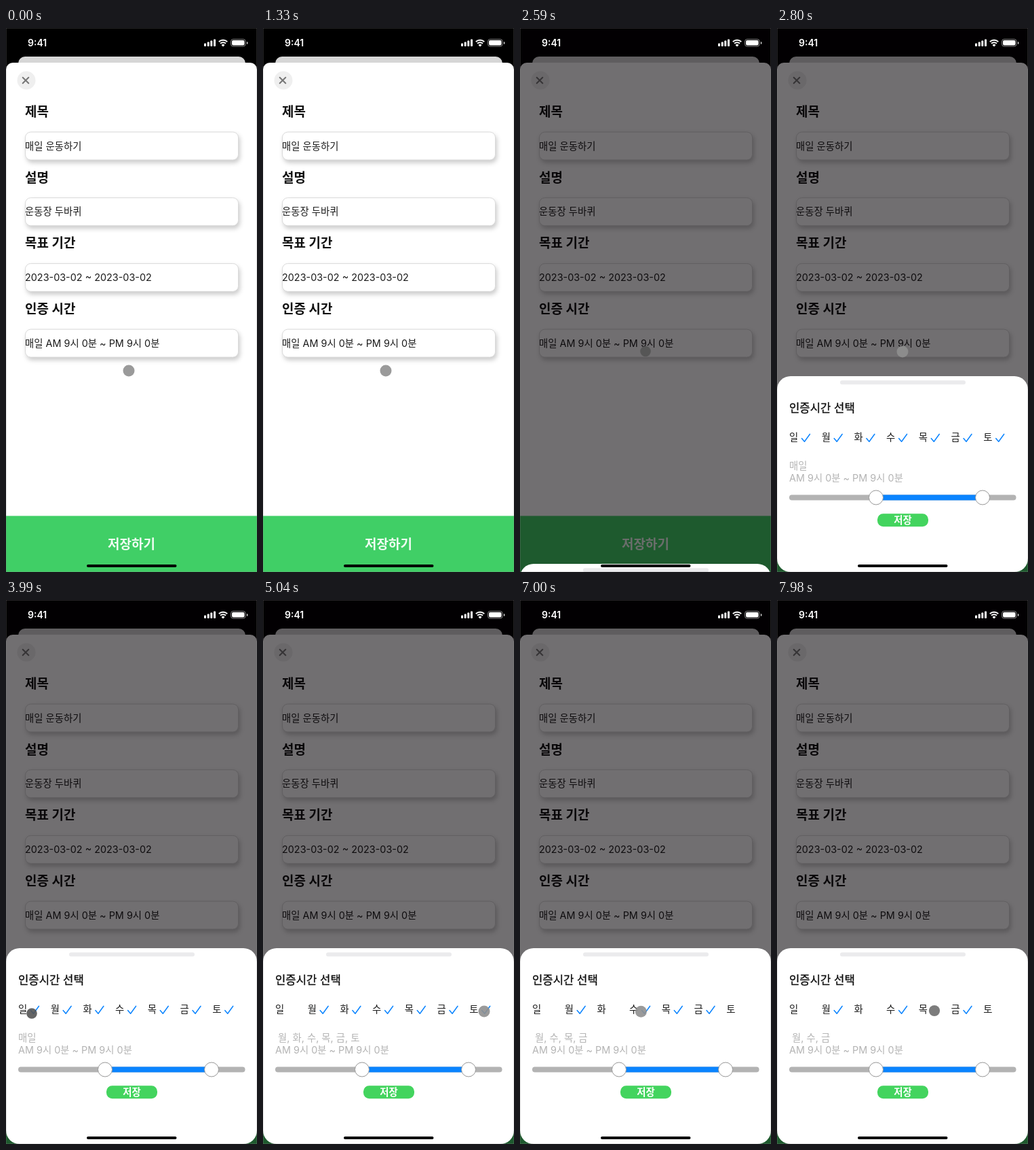
Write an HTML page that moves like this. It is 370x800 px and loops after 8000 ms.

```html
<!DOCTYPE html>
<html lang="ko">
<head>
<meta charset="utf-8">
<style>
html, body { margin: 0; width: 100%; height: 100%; overflow: hidden; background: #000; }
svg { display: block; width: 370px; height: 800px; }
text { font: 400 14.4px Inter, "Noto Sans CJK KR", sans-serif; fill: #1c1c1c; }
.head { font-size: 19px; font-weight: 700; fill: #111; }
.save { font-size: 19px; font-weight: 700; fill: #effcf2; text-anchor: middle; }
.clock { font-size: 14px; font-weight: 600; fill: #fff; }
.title { font-size: 16.7px; fill: #111; stroke: #111; stroke-width: .35; }
.muted { fill: #b4b4b4; }
.small { font-weight: 700; fill: #fff; text-anchor: middle; }
.field { fill: #fff; stroke: #d9d9d9; filter: drop-shadow(2px 4px 3px rgba(0,0,0,.2)); }
.tick { fill: none; stroke: #0a84ff; stroke-width: 1.5; stroke-linecap: round; stroke-linejoin: round; }
.thumb { fill: #fff; stroke: #999; }
</style>
</head>
<body>
<svg viewBox="0 0 370 800">
  <rect width="370" height="800"/>
  <path d="M18 60V52a10 10 0 0 1 10-10H343a10 10 0 0 1 10 10V60Z" fill="#d6d6d6"/>
  <path d="M0 800V61a10 10 0 0 1 10-10H360a10 10 0 0 1 10 10V800Z" fill="#fff"/>
  <circle cx="30" cy="77" r="13.5" fill="#efefef"/>
  <path d="M24.7 72.7l8.6 8.6m0-8.6l-8.6 8.6" stroke="#777" stroke-width="2" stroke-linecap="round"/>
  <g id="form"></g>
  <rect y="717.5" width="370" height="82.5" fill="#40cf66"/>
  <text class="save" x="185" y="766">저장하기</text>
  <rect id="dim" width="370" height="800" fill="#040004" opacity=".565"/>

  <g id="status">
    <text class="clock" x="32" y="27">9:41</text>
    <g fill="#fff">
      <rect x="292" y="22.5" width="3" height="4.5" rx="1"/>
      <rect x="296.7" y="20.5" width="3" height="6.5" rx="1"/>
      <rect x="301.3" y="18.5" width="3" height="8.5" rx="1"/>
      <rect x="306" y="16.5" width="3" height="10.5" rx="1"/>
      <path d="M320 27.5l-2.5-2.6a3.6 3.6 0 0 1 5 0Z"/>
      <rect x="333" y="18" width="18.5" height="7.5" rx="2"/>
      <path d="M355 20v4a2.2 2.2 0 0 0 0-4Z"/>
    </g>
    <g fill="none" stroke="#fff">
      <path d="M313.8 20.3a9 9 0 0 1 12.4 0M316 22.8a5.8 5.8 0 0 1 8 0" stroke-width="2"/>
      <rect x="331.5" y="16.5" width="21.5" height="10.5" rx="3.3" stroke-opacity=".5"/>
    </g>
  </g>

  <g id="sheet">
    <rect width="370" height="288" rx="20" fill="#fff"/>
    <rect x="93" y="6.3" width="185" height="6" rx="3" fill="#ebebed"/>
    <text class="title" x="18" y="53">인증시간 선택</text>
    <g id="days"></g>
    <text class="muted" id="summary" x="18" y="136.5"></text>
    <text class="muted" x="18" y="154.5">AM 9시 0분 ~ PM 9시 0분</text>
    <rect x="18" y="174.5" width="334.5" height="8" rx="4" fill="#b3b3b3"/>
    <rect x="146" y="174.5" width="157" height="8" fill="#0a84ff"/>
    <circle class="thumb" cx="146" cy="178.5" r="10.5"/>
    <circle class="thumb" cx="303" cy="178.5" r="10.5"/>
    <rect x="148" y="202.3" width="75" height="19" rx="8.5" fill="#43d45e"/>
    <text class="small" x="185.5" y="217">저장</text>
  </g>

  <rect x="119" y="789" width="132.5" height="4" rx="2"/>
  <rect x="0" y="0" width="370" height="800" fill="none" stroke="#888" stroke-opacity=".5"/>
  <circle id="pointer"/>
</svg>
<script>
const LOOP = 8000, STEP = 70;
const $ = id => document.getElementById(id);

function add(parent, tag, attrs, text = '') {
  const el = document.createElementNS('http://www.w3.org/2000/svg', tag);
  for (const k in attrs) el.setAttribute(k, attrs[k]);
  el.textContent = text;
  return parent.appendChild(el);
}

[['제목', '매일 운동하기'],
 ['설명', '운동장 두바퀴'],
 ['목표 기간', '2023-03-02 ~ 2023-03-02'],
 ['인증 시간', '매일 AM 9시 0분 ~ PM 9시 0분']
].forEach(([label, value], i) => {
  const y = 96.7 * i;
  add($('form'), 'text', { class: 'head', x: 28, y: y + 130 }, label);
  add($('form'), 'rect', { class: 'field', x: 28.5, y: y + 153, width: 314, height: 41, rx: 8 });
  add($('form'), 'text', { x: 28, y: y + 178.7 }, value);
});

const names = [...'일월화수목금토'];
const ticks = names.map((name, i) => {
  const x = 18 + 47.7 * i;
  add($('days'), 'text', { x, y: 95 }, name);
  return add($('days'), 'path', { class: 'tick', d: `M${x + 18.5} 91.5l4 4.8l8-11` });
});

// Time at which each day is switched off, by weekday index
const offAt = { 0: 4060, 6: 5180, 2: 6440, 4: 7910 };
const presses = [[2380, 2620], [3900, 4060], [5040, 5180], [6280, 6440], [7770, 7930]];
const sheetTop = [[2590, 788], [2660, 640], [2730, 545], [2800, 512]];
const path = [
  [0, 181, 504], [1500, 181, 504], [2300, 185, 475], [2850, 185, 476],
  [3700, 38, 608], [4150, 38, 608], [4900, 326, 605], [5280, 326, 605],
  [6090, 146, 607], [6220, 140, 606], [6600, 140, 606], [7500, 232, 604], [8000, 232, 604]
];

const clamp = v => Math.max(0, Math.min(1, v));
const smooth = u => u * u * (3 - 2 * u);

function sample(keys, t, ease = u => u) {
  const n = keys.findIndex(k => k[0] > t);
  if (n < 0) return keys.at(-1).slice(1);
  if (n === 0) return keys[0].slice(1);
  const a = keys[n - 1], b = keys[n];
  const u = ease((t - a[0]) / (b[0] - a[0]));
  return a.slice(1).map((v, i) => v + (b[i + 1] - v) * u);
}

function summarize(on) {
  const picked = names.filter((_, i) => on[i]);
  if (picked.length === 7) return '매일';
  if (picked.join('') === '월화수목금') return '평일';
  return '\u00a0' + picked.join(', ');
}

function draw(t) {
  const open = t >= 2590;
  $('dim').style.display = $('sheet').style.display = open ? '' : 'none';
  $('sheet').setAttribute('transform', `translate(0 ${sample(sheetTop, t)[0]})`);

  const on = names.map((_, i) => !(t >= offAt[i]));
  ticks.forEach((tick, i) => tick.style.display = on[i] ? '' : 'none');
  $('summary').textContent = summarize(on);

  const [x, y] = sample(path, t, smooth);
  const press = Math.max(...presses.map(([a, b]) =>
    Math.min(clamp((t - a) / 90), clamp(1 - (t - b) / 110))));
  const shade = Math.round(143 - 60 * press);
  $('pointer').setAttribute('transform', `translate(${x} ${y})`);
  $('pointer').setAttribute('r', 8.5 - 0.7 * press);
  $('pointer').setAttribute('fill', `rgba(${shade},${shade},${shade},.9)`);
}

const start = performance.now();
function frame(now) {
  const t = Math.max(0, now - start) % LOOP;
  draw(t - t % STEP);
  requestAnimationFrame(frame);
}
draw(0);
requestAnimationFrame(frame);
</script>
</body>
</html>
```
